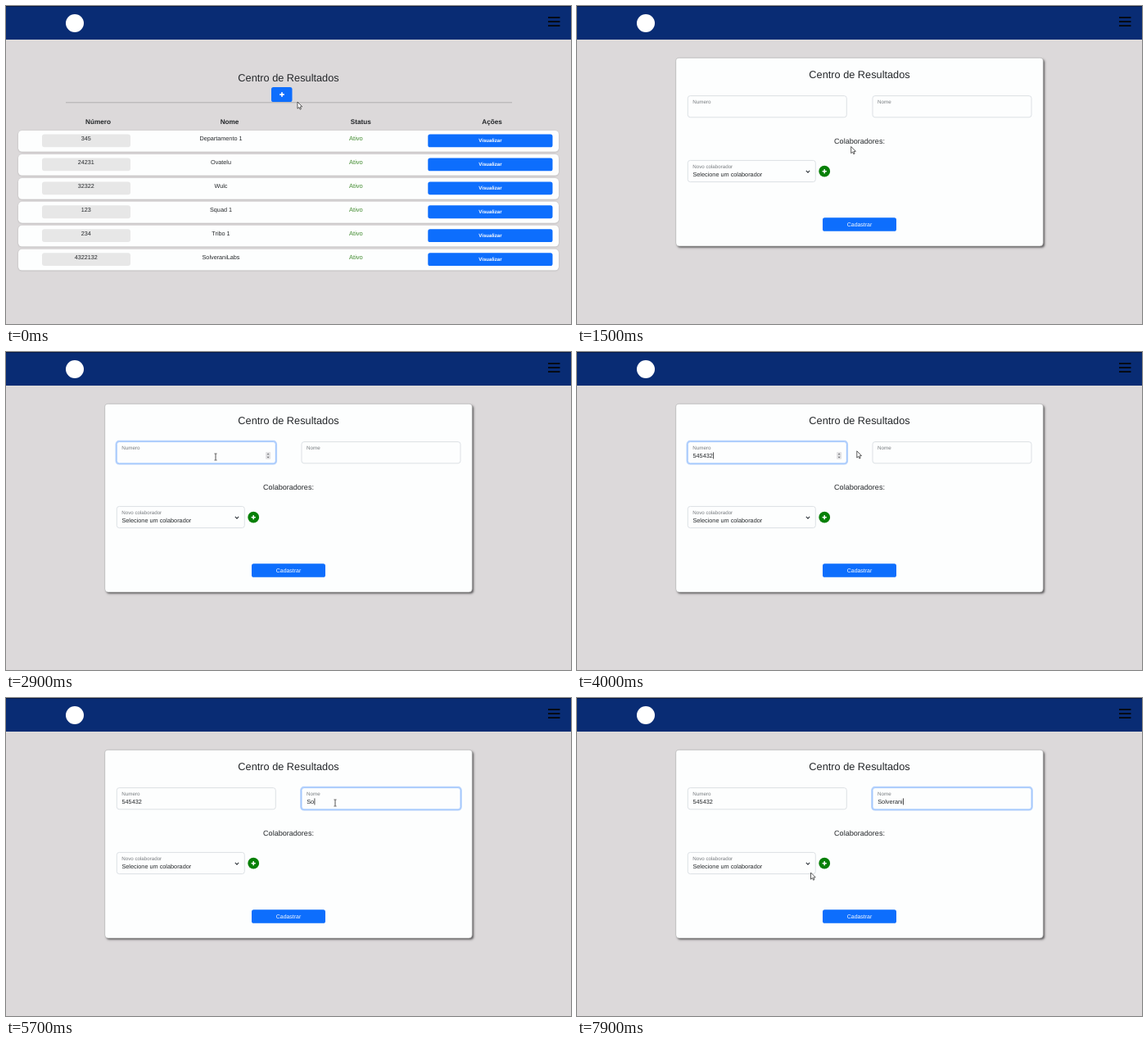
Write an HTML page with a canvas that moves like this. It is 690x388 px and loops after 8 s.

```html
<!DOCTYPE html>
<html lang="pt">
<head>
<meta charset="utf-8">
<title>Centro de Resultados</title>
<style>
html, body { margin: 0; width: 100%; height: 100%; overflow: hidden; background: #dcd9da; }
canvas { display: block; width: 690px; height: 388px; }
</style>
</head>
<body>
<canvas id="stage" width="690" height="388"></canvas>
<script>
const ctx = document.getElementById('stage').getContext('2d');
const LOOP = 8000, STEP = 100;
const BLUE = '#0d6efd', BLUE_DARK = '#0b5ed7', INK = '#24272a';
const FONT = '"Liberation Sans", Arial, sans-serif';

const rows = [
  ['345', 'Departamento 1'], ['24231', 'Ovatelu'], ['32322', 'Wulc'],
  ['123', 'Squad 1'], ['234', 'Tribo 1'], ['4322132', 'SolveraniLabs']
];

// Pointer path: time, x, y
const path = [
  [0, 356, 117], [300, 356, 117], [800, 347, 108], [900, 347, 108],
  [1000, 337, 101], [1100, 337, 101], [1200, 337, 121], [1400, 335.7, 173],
  [1500, 334.7, 171.5], [2000, 325, 172], [2500, 256.5, 127.5],
  [2600, 256.5, 127.5], [2700, 256, 128], [3000, 256, 128],
  [3200, 256, 111.5], [3700, 256, 111.5], [4200, 399, 127],
  [4400, 402, 128], [6900, 402, 128], [7800, 313, 201], [7900, 285.5, 213]
];

const FORM_AT = 1500, FOCUS_1 = 2350, FOCUS_2 = 4350;
const numberKeys = [3400, 3500, 3600, 3700, 3800, 3900];
const nameKeys = [5500, 5700, 5800, 5900, 6000, 6100, 6400, 6400, 6500];

const clamp = v => Math.max(0, Math.min(1, v));
const inside = (p, x, y, w, h) => p.x >= x && p.x <= x + w && p.y >= y && p.y <= y + h;
const typed = (word, keys, t) => word.slice(0, keys.filter(k => k <= t).length);

function pointerAt(t) {
  const i = path.findIndex(k => k[0] > t);
  if (i < 0) { const [, x, y] = path[path.length - 1]; return { x, y }; }
  const [t0, x0, y0] = path[i - 1], [t1, x1, y1] = path[i];
  const f = (t - t0) / (t1 - t0);
  return { x: x0 + (x1 - x0) * f, y: y0 + (y1 - y0) * f };
}

function box(x, y, w, h, r, fill, stroke, line = 0.7) {
  ctx.beginPath();
  ctx.roundRect(x, y, w, h, r);
  if (fill) { ctx.fillStyle = fill; ctx.fill(); }
  if (stroke) { ctx.strokeStyle = stroke; ctx.lineWidth = line; ctx.stroke(); }
}

function text(str, x, y, size, color = INK, align = 'center', weight = 'normal') {
  ctx.font = `${weight} ${size}px ${FONT}`;
  ctx.textAlign = align;
  ctx.fillStyle = color;
  ctx.fillText(str, x, y);
}

function shape(points, fill, stroke, line) {
  ctx.beginPath();
  points.forEach(([x, y]) => ctx.lineTo(x, y));
  if (fill) { ctx.closePath(); ctx.fillStyle = fill; ctx.fill(); }
  if (stroke) { ctx.strokeStyle = stroke; ctx.lineWidth = line; ctx.stroke(); }
}

function disc(x, y, r, color) {
  ctx.beginPath();
  ctx.arc(x, y, r, 0, Math.PI * 2);
  ctx.fillStyle = color;
  ctx.fill();
}

function plus(x, y, r, w) {
  ctx.fillStyle = '#fff';
  ctx.fillRect(x - r, y - w / 2, r * 2, w);
  ctx.fillRect(x - w / 2, y - r, w, r * 2);
}

function shadow(color, blur, dx, dy) {
  ctx.shadowColor = color;
  ctx.shadowBlur = blur;
  ctx.shadowOffsetX = dx;
  ctx.shadowOffsetY = dy;
}

function header() {
  ctx.fillStyle = '#dcd9da';
  ctx.fillRect(0, 0, 690, 388);
  ctx.fillStyle = '#092c74';
  ctx.fillRect(0, 0, 690, 41);
  ctx.fillStyle = '#061a48';
  ctx.fillRect(0, 0, 690, 1);
  disc(84, 21, 11, '#fff');
  ctx.fillStyle = '#05070c';
  [13.2, 18.2, 23.2].forEach(y => ctx.fillRect(662, y, 14.5, 1.8));
}

const onAdd = p => inside(p, 324, 99, 25.5, 18);

function list(t, p) {
  text('Centro de Resultados', 345, 92, 12.75);
  ctx.fillStyle = '#b0aeaf';
  ctx.fillRect(73, 117.3, 545, 1);
  box(324, 99, 25.5, 18, 2.6, onAdd(p) || t >= 1000 ? BLUE_DARK : BLUE);
  plus(337, 108, 2.8, 1.7);

  const heads = [['Número', 112.5], ['Nome', 273], ['Status', 433.3], ['Ações', 593.5]];
  heads.forEach(([s, x]) => text(s, x, 143.6, 8.2, INK, 'center', 'bold'));

  rows.forEach(([num, name], i) => {
    const y = 152 + i * 28.95;
    shadow('rgba(0,0,0,.2)', 2, 0, 0.5);
    box(15, y, 660, 25.8, 4.5, '#fdfefe');
    shadow('transparent', 0, 0, 0);
    box(44, y + 4.5, 108, 15.8, 3, '#e7e7e7');
    text(num, 97.8, y + 12.4, 7.2);
    text(name, 262.5, y + 12.4, 7.25);
    text('Ativo', 427.4, y + 12.4, 7.5, '#3f8a2c');
    box(515.3, y + 4.5, 152.2, 15.8, 2.6, BLUE);
    text('Visualizar', 591.4, y + 14.4, 6.1, '#fff', 'center', 'bold');
  });
}

function field(x, label, value, focus, caret) {
  if (focus > 0) {
    ctx.globalAlpha = focus;
    box(x - 0.8, 108.8, 195.6, 27.8, 3.6, null, '#b6d2fc', 2);
    ctx.globalAlpha = 1;
  }
  box(x, 109.6, 194, 26.2, 3, '#fdfefe', focus > 0.5 ? '#86b7fe' : '#ced4da');
  text(label, x + 6, 119.2, 6.25, '#777b7f', 'left');
  text(value, x + 6.2, 129.2, 7.3, INK, 'left');
  if (caret) {
    const end = x + 6.6 + ctx.measureText(value).width;
    ctx.fillStyle = '#222';
    ctx.fillRect(end, 122.4, 0.8, 8);
  }
}

function spinner() {
  box(317, 122, 6.2, 8.8, 0.8, '#e4e4e6');
  shape([[318.6, 125.2], [320.1, 123.4], [321.6, 125.2]], '#66686b');
  shape([[318.6, 127.8], [320.1, 129.6], [321.6, 127.8]], '#66686b');
}

function form(t, p) {
  shadow('rgba(50,48,49,.75)', 2.5, 1.8, 1.8);
  box(120.7, 63.3, 448.6, 229.7, 4, '#fdfefe');
  shadow('transparent', 0, 0, 0);
  box(120.7, 63.3, 448.6, 229.7, 4, null, '#aaa9aa', 0.6);
  text('Centro de Resultados', 345, 88.3, 12.75);

  const first = t < FOCUS_2;
  const focus1 = first ? clamp((t - FOCUS_1) / 150) : clamp(1 - (t - FOCUS_2) / 150);
  const focus2 = clamp((t - FOCUS_2) / 150);
  const caret1 = first && t >= 2400 && (t < 2900 || t >= 3400);
  const caret2 = (t >= 4500 && t < 5000) || (t >= 5500 && t < 7000) || t >= 7500;
  field(135.3, 'Numero', typed('545432', numberKeys, t), focus1, caret1);
  field(361, 'Nome', typed('Solverani', nameKeys, t), focus2, caret2);
  if ((t >= FOCUS_1 && first) || inside(p, 135, 109, 194, 27)) spinner();

  text('Colaboradores:', 345, 167.7, 9.05);
  box(135.3, 188.4, 156, 26.2, 3, '#fdfefe', '#ced4da');
  text('Novo colaborador', 141.3, 198.2, 6.2, '#777b7f', 'left');
  text('Selecione um colaborador', 141.4, 208.3, 7.3, INK, 'left');
  shape([[279.8, 200.8], [282, 203.1], [284.2, 200.8]], null, '#343a40', 1.1);
  disc(302.2, 201.7, 6.9, '#078007');
  plus(302.2, 201.7, 2.6, 1.5);
  box(300, 258.3, 90, 16.5, 2.6, BLUE);
  text('Cadastrar', 345, 268.6, 6.95, '#fff');
}

function arrow() {
  shape([[0, 0], [0, 8.2], [1.9, 6.5], [3.1, 9.2], [4.4, 8.6], [3.2, 6], [5.7, 5.8], [0, 0]],
    '#fff', '#333', 0.8);
}

function hand() {
  box(-1.8, 4, 6.6, 5, 1.8, '#fff', '#333', 0.7);
  box(-0.8, 0, 1.8, 6.5, 0.9, '#fff', '#333', 0.7);
  ctx.fillStyle = '#fff';
  ctx.fillRect(-0.5, 4, 4.4, 3);
}

function beam() {
  shape([[-1.6, -4], [1.6, -4]], null, '#555', 0.8);
  shape([[0, -4], [0, 4]], null, '#444', 0.9);
  shape([[-1.6, 4], [1.6, 4]], null, '#555', 0.8);
}

function pointer(t, p) {
  const listed = t < FORM_AT;
  const overText = listed ? p.y > 152
    : inside(p, 135, 109, 194, 27) || inside(p, 361, 109, 194, 27);
  ctx.save();
  ctx.translate(p.x, p.y);
  if (listed && onAdd(p)) hand();
  else if (overText) beam();
  else arrow();
  ctx.restore();
}

function draw(now) {
  const t = Math.floor((now % LOOP) / STEP) * STEP;
  const p = pointerAt(t);
  ctx.textRendering = 'geometricPrecision';
  header();
  (t < FORM_AT ? list : form)(t, p);
  pointer(t, p);
}

let start;
function tick(now) {
  start ??= now;
  draw(now - start);
  requestAnimationFrame(tick);
}
draw(0);
requestAnimationFrame(tick);
</script>
</body>
</html>
```
